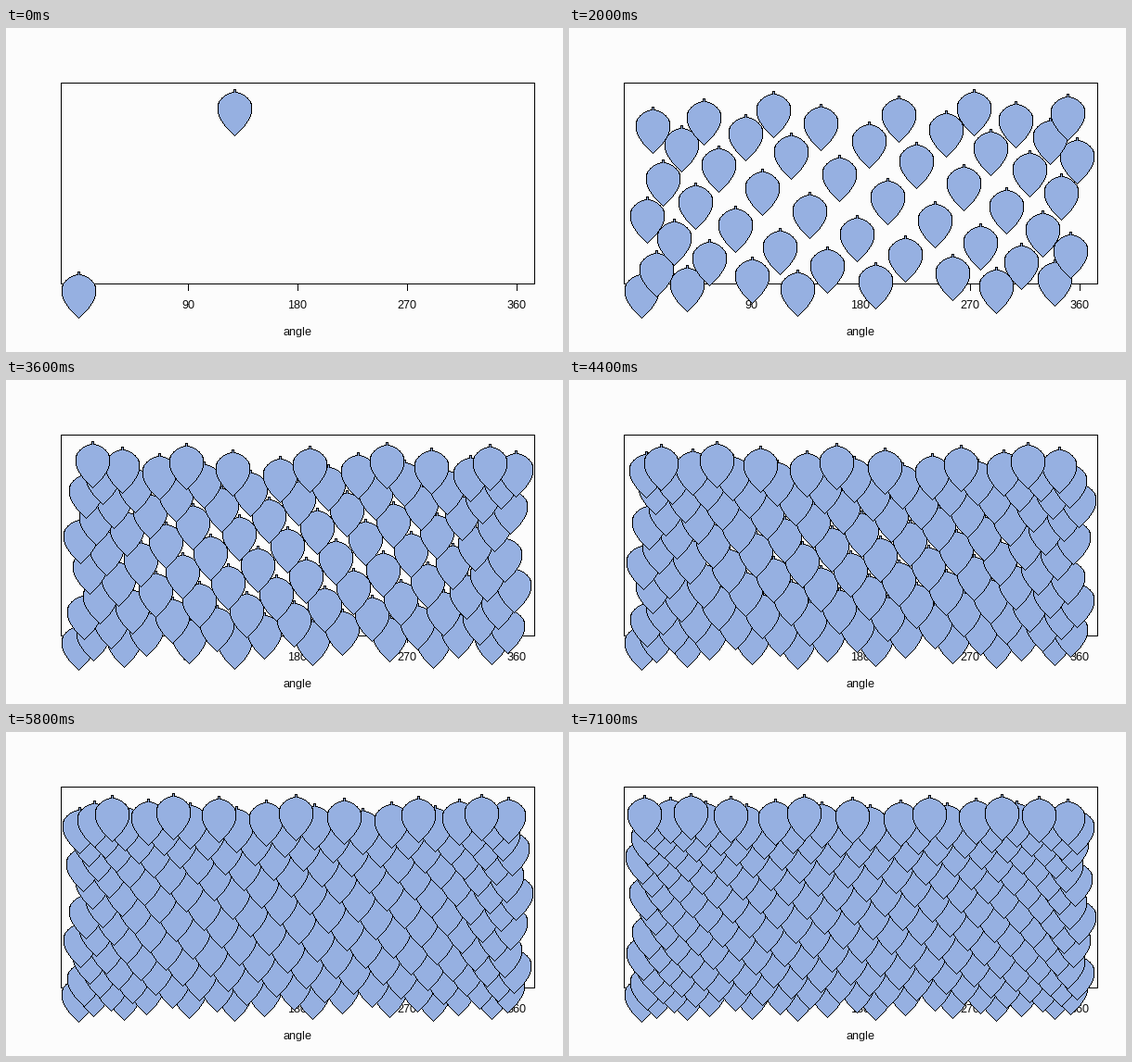
These frames come from a looping animation (600 by 350 pixels, 9300 ms). A matplotlib script:

```python
import numpy as np
import matplotlib.pyplot as plt
from matplotlib.animation import FuncAnimation
from matplotlib.collections import PolyCollection

W, H, DPI = 600, 350, 100
TICK = 100                  # ms per frame
FRAMES = 93
LAST_STEP = 70
GOLDEN = 180 * (3 - 5 ** 0.5)
ECC = 0.29                  # crowding of the leaves toward 0 and 360 degrees
BEND = 1.15                 # how strongly spacing shrinks at base and apex
X0, PX_PER_DEG = 78.2, 118 / 90
BASE_Y, RISE = 263, 197
LEAF_H, LEAF_R, STALK_H = 50, 18.5, 3

plt.rcParams.update({
    "font.family": "Liberation Sans",
    "text.hinting": "native",
    "text.hinting_factor": 1,
})


def leaf_outline():
    """Stalk and teardrop body, clockwise from the top right of the stalk."""
    v = np.linspace(0.07, 1, 26) ** 2
    peak = 0.375
    width = (v / peak) ** 0.6 * (1 - v) / (1 - peak)
    body = np.column_stack([LEAF_R * width, STALK_H + (LEAF_H - STALK_H) * v])
    half = np.vstack([(1, 0), (1, STALK_H), body])
    return np.vstack([half, half[-2::-1] * (-1, 1)])


def unit(vec):
    return vec / np.linalg.norm(vec, axis=1, keepdims=True)


def leaf_layers():
    """Black shape and the blue one inside it, leaving a one pixel rim."""
    path = leaf_outline()
    edge = unit(np.roll(path, -1, axis=0) - path)
    tangent = unit(edge + np.roll(edge, 1, axis=0))
    normal = np.column_stack([tangent[:, 1], -tangent[:, 0]])
    size = np.abs(normal)
    small = size.min(axis=1, keepdims=True)
    large = size.max(axis=1, keepdims=True)
    # hard-edged fills also cover every pixel they touch
    outer = path - normal * small / 2
    inner = path - normal * (large + small / 2)
    return np.stack([outer, inner])


def leaf_count(step):
    # growth speeds up from one to three leaves per step
    return 2 + sum(min(3, 1 + i // 3) for i in range(step))


def leaf_tops(count):
    n = np.arange(count)
    theta = np.radians(n * GOLDEN % 360)
    shift = np.arctan2(ECC * np.sin(theta), 1 - ECC * np.cos(theta))
    x = X0 + PX_PER_DEG * np.degrees(theta - shift)
    u = n / (count - 1)
    rise = (1 + np.sin(BEND * (2 * u - 1)) / np.sin(BEND)) / 2
    y = BASE_Y - RISE * rise
    return np.round(np.column_stack([x, y])) + 0.5


fig = plt.figure(figsize=(W / DPI, H / DPI), dpi=DPI, facecolor="#fcfcfc")
ax = fig.add_axes([0, 0, 1, 1])
ax.set_xlim(0, W)
ax.set_ylim(H, 0)
ax.axis("off")


def line(xs, ys):
    ax.plot(xs, ys, color="black", lw=0.72, antialiased=False, zorder=1)


def label(x, y, text):
    ax.text(x, y, text, size=12 * 72 / DPI, color="black",
            ha="center", va="baseline", zorder=1)


line([59, 569, 569, 59, 59], [59, 59, 276, 276, 59])
for deg in range(90, 361, 90):
    x = 78 + deg * PX_PER_DEG
    line([x, x], [276, 283])
    label(x, 303, str(deg))
label(314, 332, "angle")

LAYERS = leaf_layers()
leaves = PolyCollection([], facecolors=["black", "#96b0e1"],
                        edgecolors="none", linewidths=0,
                        antialiaseds=False, zorder=3)
leaves.set_snap(False)
ax.add_collection(leaves, autolim=False)


def draw(frame):
    step = min(max(frame - 1, 0), LAST_STEP)
    tops = leaf_tops(leaf_count(step))
    shapes = tops[:, None, None, :] + LAYERS
    leaves.set_verts(shapes.reshape(-1, *LAYERS.shape[1:]))
    return (leaves,)


anim = FuncAnimation(fig, draw, frames=FRAMES, interval=TICK,
                     init_func=lambda: draw(0), repeat=True, repeat_delay=0)
plt.show()
```
